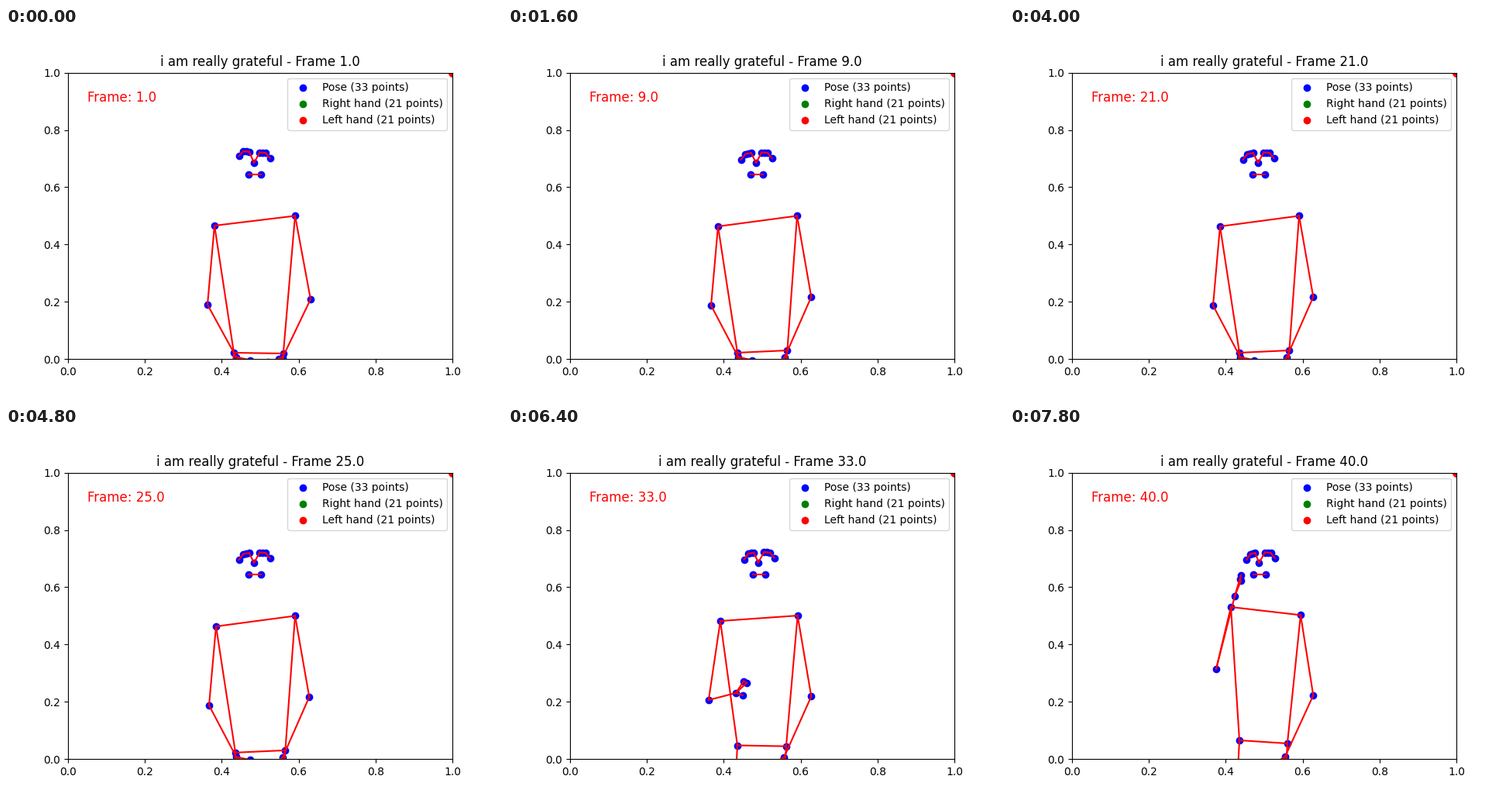
These frames come from a looping animation (640 by 480 pixels, 8 s). A matplotlib script:

```python
import numpy as np
import matplotlib.pyplot as plt
from matplotlib.animation import FuncAnimation

FRAMES = 40
PHRASE = "i am really grateful"

# Resting joints in stage pixels: odd ones are the left side, even ones the right.
REST = {
    11: (373, 242.4), 12: (271, 256),    # shoulders
    13: (391.3, 347), 14: (262, 358),    # elbows
    15: (357, 425), 16: (297, 424.5),    # wrists
    17: (347, 445), 18: (304, 440),      # little fingers
    19: (342, 437), 20: (314, 436),      # index fingers
    21: (350, 434), 22: (315, 428.5),    # thumbs
    23: (360.4, 416), 24: (296, 419),    # hips
    25: (351, 540), 26: (289, 540),      # knees
}
RIGHT_ARM = (14, 16, 18, 20, 22)

# Joint shifts: fading out at the start, leaning, raising the hand, bowing its path.
SETTLE = {12: (-2, -1), 13: (1.7, 3), 14: (-2, -1), 19: (-4, -6), 21: (2, -7),
          23: (-2.6, 4), 24: (-2, 0)}
LEAN = {23: (-2.5, -9), 24: (0, -16), **{j: (0, -16) for j in RIGHT_ARM}}
LIFT = {11: (2, -1), 12: (14, -25), 13: (0, -2), 14: (4, -31), 15: (-2, -1),
        16: (-7, -191.5), 18: (-7, -229), 20: (-16, -230), 21: (-9, -1),
        22: (-17, -215.5)}
BOW = {12: (-2, 1.7), 14: (-5, 14.5), 16: (-0.7, -9), 18: (2.7, -29),
       20: (-0.7, -21.7), 21: (-3, -2), 22: (-7, -1)}

# Half of a face around the nose: eye from inside to outside, then ear.
NOSE = np.array([320, 174])
EYE = np.array([(6.8, -13), (10.5, -12.6), (14.5, -12), (20, -5)])

BONES = [(0, 1), (1, 2), (2, 3), (3, 7), (0, 4), (4, 5), (5, 6), (6, 8), (9, 10),
         (11, 12), (11, 13), (13, 15), (15, 17), (15, 19), (15, 21), (17, 19),
         (12, 14), (14, 16), (16, 18), (16, 20), (16, 22), (18, 20),
         (11, 23), (12, 24), (23, 24), (23, 25), (24, 26)]


def smooth(n, start, end):
    u = np.clip((n - start) / (end - start), 0, 1)
    return u * u * (3 - 2 * u)


def face(settle, lift, bow):
    left = EYE + (0.6, 0) - 0.05 * np.outer(EYE[:, 0], (0, 1))
    right = EYE * (-1, 1) + (0.6, 0) + 0.05 * np.outer(EYE[:, 0], (0, 1))
    # The right half starts raised and later turns away.
    right += np.outer(EYE[:, 0], (0.17 * lift, -0.24 * settle))
    mouth = [(9, 15), (-7, 15)]
    around = np.vstack([(0, 0), left[:3], right[:3], left[3], right[3], mouth])
    return NOSE + around + (1.4 * lift + 2.8 * bow, -0.5 * bow)


def pose(n):
    settle = max(0, 1 - (n - 1) / 8) ** 2
    lean = smooth(n, 24, 40)
    lift = smooth(n, 28.5, 40)
    bow = 4 * lift * (1 - lift)
    body = np.array([REST[j] for j in sorted(REST)], float)
    for amount, shifts in [(settle, SETTLE), (lean, LEAN), (lift, LIFT), (bow, BOW)]:
        for j, shift in shifts.items():
            body[j - 11] += amount * np.array(shift)
    px = np.vstack([face(settle, lift, bow), body])
    return np.column_stack([(px[:, 0] - 80) / 496, (427.2 - px[:, 1]) / 369.6])


fig, ax = plt.subplots(figsize=(6.4, 4.8), dpi=100)
ax.set_xlim(0, 1)
ax.set_ylim(0, 1)

joints = ax.scatter([], [], c="blue", label="Pose (33 points)")
# Undetected hands rest in the corner.
corner = np.ones(21)
ax.scatter(corner, corner, c="green", label="Right hand (21 points)")
ax.scatter(corner, corner, c="red", label="Left hand (21 points)")
bones = [ax.plot([], [], color="red", lw=1.5)[0] for _ in BONES]
counter = ax.text(0.05, 0.9, "", color="red", fontsize=12, transform=ax.transAxes)
title = ax.set_title("")
ax.legend(loc="upper right")


def draw(i):
    n = i + 1
    pts = pose(n)
    joints.set_offsets(pts)
    for line, pair in zip(bones, BONES):
        line.set_data(pts[list(pair)].T)
    counter.set_text(f"Frame: {n:.1f}")
    title.set_text(f"{PHRASE} - Frame {n:.1f}")
    return [joints, *bones, counter, title]


anim = FuncAnimation(fig, draw, frames=FRAMES, interval=200, repeat=True, repeat_delay=0)
plt.show()
```
